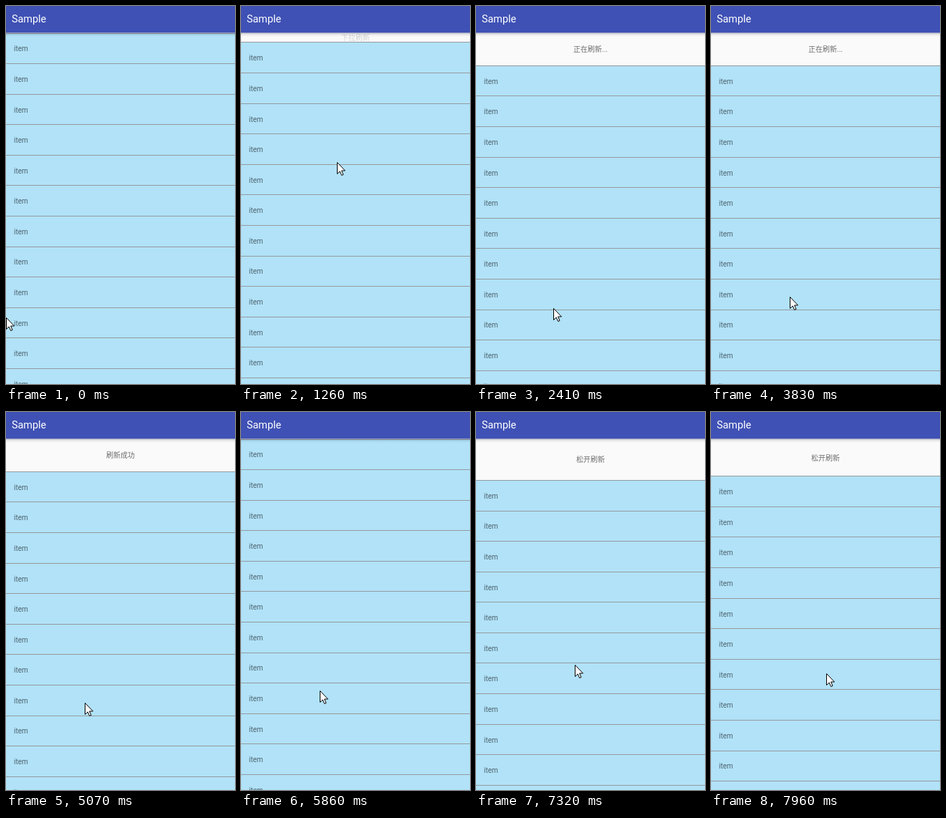
Recreate the animation shown at these times as an HTML page with a canvas. Size 320x528 px, loop 7990 ms.

```html
<!DOCTYPE html>
<html lang="zh-CN">
<head>
<meta charset="utf-8">
<title>Pull to refresh</title>
<style>
html, body { margin: 0; width: 100%; height: 100%; overflow: hidden; background: #fafafa; }
canvas { display: block; width: 320px; height: 528px; }
</style>
</head>
<body>
<canvas id="stage"></canvas>
<script>
const W = 320, H = 528, LOOP = 7990;
const BAR = 37.4, TOP = 38, ROW = 42.58, HEADER = 45.4;
const INK = 'rgba(0,0,0,0.56)';
const UI_FONT = 'Roboto, sans-serif';
const LABEL_FONT = 'Roboto, "Noto Sans CJK SC", "Noto Sans CJK", sans-serif';

// The list follows the finger late, damped and after a short slop.
const LAG = 58, DAMPING = 0.53, SLOP = 5;
const firstDrag = 1030, release = 2000, settled = 2395;
const refreshed = 5040, closing = 5540, closed = 5680, secondDrag = 6200;

// Pointer gestures in order, each starting where the one before ended.
const pointerStart = { x: 0, y: 435 };
const gestures = [
  { from: 10, to: 820, x: 140, y: 175 },
  { from: 830, to: 900, x: 140, y: 168 },
  { from: firstDrag, to: 1840, x: 108, y: 422 },
  { from: 3120, to: 3620, x: 110, y: 406 },
  { from: 5830, to: 5860, x: 110, y: 389 },
  { from: 5860, to: 6150, x: 113, y: 249 },
  { from: secondDrag, to: 6850, x: 115, y: 410 },
  { from: 6850, to: 7650, x: 151, y: 319 },
  { from: 7650, to: 8350, x: 175, y: 430 }
];

const canvas = document.getElementById('stage');
const ctx = canvas.getContext('2d');
const dpr = window.devicePixelRatio || 1;
canvas.width = W * dpr;
canvas.height = H * dpr;

const progress = (t, from, to) => Math.min(1, Math.max(0, (t - from) / (to - from)));
const smooth = u => u * u * (3 - 2 * u);
const easeOut = u => 1 - (1 - u) ** 3;
const mix = (a, b, u) => a + (b - a) * u;

function pointerAt(t) {
  let { x, y } = pointerStart;
  for (const g of gestures) {
    if (t < g.from) break;
    const u = smooth(progress(t, g.from, g.to));
    x = mix(x, g.x, u);
    y = mix(y, g.y, u);
  }
  return { x, y };
}

function dragPull(t, start) {
  const travel = pointerAt(Math.max(start, t - LAG)).y - pointerAt(start).y;
  return Math.max(0, DAMPING * (travel - SLOP));
}

function pullAt(t) {
  if (t < firstDrag) return 0;
  if (t < release) return dragPull(t, firstDrag);
  if (t < closing) {
    return mix(dragPull(release, firstDrag), HEADER, easeOut(progress(t, release, settled)));
  }
  if (t < secondDrag) return HEADER * (1 - smooth(progress(t, closing, closed)));
  return dragPull(t, secondDrag);
}

function labelAt(t, pull) {
  if (t >= refreshed && t < secondDrag) return '刷新成功';
  if (t >= settled && t < refreshed) return '正在刷新...';
  return pull >= HEADER ? '松开刷新' : '下拉刷新';
}

function drawText(text, x, y, font, color, align = 'left') {
  ctx.font = font;
  ctx.fillStyle = color;
  ctx.textAlign = align;
  ctx.fillText(text, x, y);
}

function drawHeader(t, pull) {
  if (pull <= 0) return;
  const y = Math.round(TOP + pull / 2 + 3.6);
  ctx.globalAlpha = Math.min(1, pull / HEADER);
  drawText(labelAt(t, pull), W / 2, y, '10px ' + LABEL_FONT, INK, 'center');
  ctx.globalAlpha = 1;
}

function drawList(pull) {
  const top = TOP + pull;
  ctx.fillStyle = '#b1e2f8';
  ctx.fillRect(0, Math.floor(top), W, H);
  for (let y = top; y < H; y += ROW) {
    ctx.fillStyle = '#969a9e';
    ctx.fillRect(0, Math.floor(y), W, 1);
    drawText('item', 11, Math.round(y + 25.4), '10px ' + UI_FONT, INK);
  }
}

function drawBar() {
  const depth = 5.5;
  const shade = ctx.createLinearGradient(0, BAR, 0, BAR + depth);
  shade.addColorStop(0, 'rgba(0,0,0,0.26)');
  shade.addColorStop(0.4, 'rgba(0,0,0,0.08)');
  shade.addColorStop(1, 'rgba(0,0,0,0)');
  ctx.fillStyle = shade;
  ctx.fillRect(0, BAR, W, depth);
  ctx.fillStyle = '#3f51b5';
  ctx.fillRect(0, 0, W, BAR);
  drawText('Sample', 8, 23, '14.4px ' + UI_FONT, '#fff');
}

const arrow = new Path2D('M.5 .5V16.5L4.2 13L6.7 18.5L9 17.5L6.6 12H11.5Z');

function drawPointer({ x, y }) {
  ctx.save();
  ctx.translate(Math.round(x), Math.round(y));
  ctx.fillStyle = '#fff';
  ctx.strokeStyle = '#000';
  ctx.lineWidth = 1;
  ctx.fill(arrow);
  ctx.stroke(arrow);
  ctx.restore();
}

function draw(t) {
  const pull = pullAt(t);
  ctx.setTransform(dpr, 0, 0, dpr, 0, 0);
  ctx.fillStyle = '#fafafa';
  ctx.fillRect(0, 0, W, H);
  drawHeader(t, pull);
  drawList(pull);
  drawBar();
  drawPointer(pointerAt(t));
}

let start;
function frame(now) {
  start ??= now;
  draw((now - start) % LOOP);
  requestAnimationFrame(frame);
}
requestAnimationFrame(frame);
</script>
</body>
</html>
```
